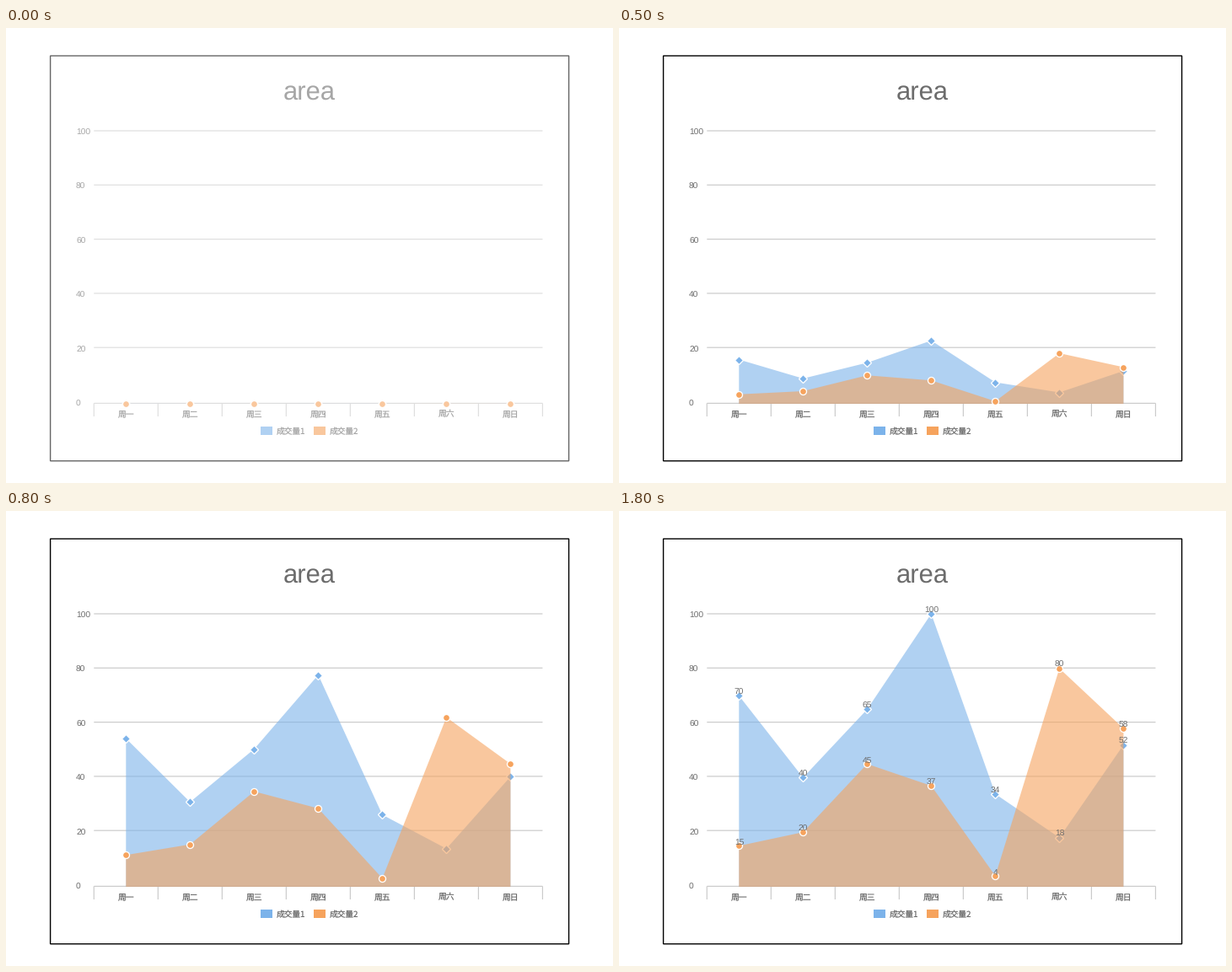
Animation, 720 px wide and 540 px high, one loop 1.85 s. Source, as a matplotlib script:

```python
import numpy as np
import matplotlib.pyplot as plt
from matplotlib.animation import FuncAnimation
from matplotlib.patches import Polygon, Rectangle

W, H, DPI = 720, 540, 100
PX = 72 / DPI  # points per pixel
FRAMES, STEP = 37, 50

GREY, RULE = "#6c6c6c", "#cbcbcb"
BLUE, ORANGE = "#7cb3ea", "#f6a35d"
LATIN, CJK = "Liberation Sans", "Noto Sans CJK JP"

LEFT, SLOT, BASE, UNIT = 104.3, 76.02, 446, 3.24
DAYS = "一二三四五六日"
SERIES = [
    ("成交量1", BLUE, "D", 6.7, 302, [70, 40, 65, 100, 34, 18, 52]),
    ("成交量2", ORANGE, "o", 8.0, 365, [15, 20, 45, 37, 4, 80, 58]),
]
xs = LEFT + SLOT * (np.arange(7) + 0.5)

plt.rcParams["text.hinting"] = "none"
fig = plt.figure(figsize=(W / DPI, H / DPI), dpi=DPI, facecolor="white")
ax = fig.add_axes([0, 0, 1, 1])
ax.set(xlim=(0, W), ylim=(H, 0))
ax.axis("off")


def label(x, y, text, size, font=LATIN, ha="center", z=1):
    return ax.text(x, y, text, fontsize=size * PX, family=font, color=GREY,
                   ha=ha, va="baseline", zorder=z)


def rule(x0, y0, x1, y1):
    ax.plot([x0, x1], [y0, y1], color=RULE, lw=1.2 * PX, snap=False,
            solid_capstyle="butt", zorder=1)


ax.add_patch(Rectangle((52.6, 33), 615, 480.8, fill=False, ec="black",
                       lw=1.4 * PX, snap=False))
label(360, 84.3, "area", 31)

right = LEFT + 7 * SLOT
for i in range(6):
    y = 122 + 64.3 * i if i < 5 else 445.4
    rule(LEFT, y, right, y)
    label(83, 127 + 64.4 * i, str(100 - 20 * i), 10.2, ha="left")
for i in range(8):
    rule(LEFT + SLOT * i, 445.4, LEFT + SLOT * i, 461)
for x, day in zip(xs, DAYS):
    label(x, 461.3, "周" + day, 9.8, CJK)

parts, values = [], []
for n, (name, color, shape, size, key_x, data) in enumerate(SERIES):
    ax.add_patch(Rectangle((key_x, 473.2), 14.4, 9.7, fc=color, lw=0))
    label(key_x + 19, 482, name, 9.7, CJK, "left")
    area = Polygon([(0, 0)] * 3, fc=color, alpha=0.6, lw=0, zorder=3 + 2 * n)
    ax.add_patch(area)
    dots, = ax.plot([], [], shape, ms=size * PX, mfc=color, mec="white",
                    mew=1.3 * PX, zorder=4 + 2 * n)
    parts.append((area, dots, np.array(data)))
    values += [label(x + 0.3, BASE - UNIT * v - 1.4, str(v), 10.3, z=8)
               for x, v in zip(xs, data)]

veil = Rectangle((0, 0), W, H, fc="white", lw=0, zorder=10)
ax.add_patch(veil)


def growth(ms):
    """Cubic ease-in over a slightly uneven clock."""
    return np.interp(ms, [0, 350, 600, 800, 885],
                     [0.08, 0.434, 0.734, 0.919, 1]) ** 3


def draw(frame):
    p = growth(frame * STEP)
    for area, dots, data in parts:
        ys = BASE - UNIT * data * p
        area.set_xy([(xs[0], BASE), *zip(xs, ys), (xs[-1], BASE)])
        dots.set_data(xs, ys)
    for text in values:
        text.set_visible(p >= 1)
    veil.set_alpha(max(0, 0.4 - 0.25 * frame))
    return []


anim = FuncAnimation(fig, draw, frames=FRAMES, interval=STEP,
                     repeat=True, repeat_delay=0)
plt.show()
```
